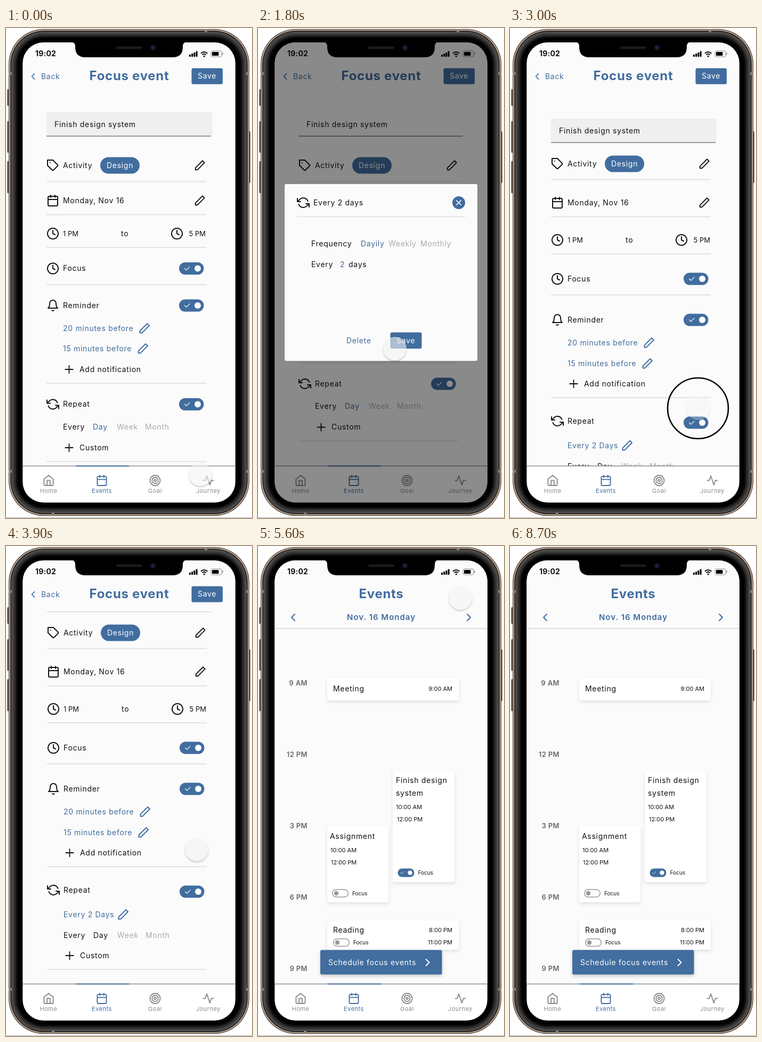
An HTML page for the animation above (8800 ms loop, 462 by 920 pixels).

```html
<!DOCTYPE html>
<html lang="en">
<head>
<meta charset="utf-8">
<title>Focus event</title>
<style>
  html, body { margin: 0; height: 100%; overflow: hidden; background: #fff; }
  svg { display: block; width: 100vw; height: 100vh; }
  .icon { fill: none; stroke-width: 2; stroke-linecap: round; stroke-linejoin: round; }
  .card { fill: #fff; filter: drop-shadow(0 3px 3px rgba(0, 0, 0, .1)); }
  #cursor { filter: drop-shadow(0 2px 1.5px rgba(0, 0, 0, .35)); }
</style>
</head>
<body>
<svg id="stage" viewBox="0 0 462 920"></svg>
<script>
const LOOP = 8800;
const BLUE = '#416d9f', INK = '#111', GRAY = '#aaa', PAGE = '#fbfbfb';

const ICONS = {
  tag: 'M20.59 13.41l-7.17 7.17a2 2 0 0 1-2.83 0L2 12V2h10l8.59 8.59a2 2 0 0 1 0 2.82zM7 7h.01',
  calendar: 'M5 4h14a2 2 0 0 1 2 2v14a2 2 0 0 1-2 2H5a2 2 0 0 1-2-2V6a2 2 0 0 1 2-2zM16 2v4M8 2v4M3 10h18',
  clock: 'M12 2a10 10 0 1 0 .01 0zM12 6v6l4 2',
  bell: 'M18 8A6 6 0 0 0 6 8c0 7-3 9-3 9h18s-3-2-3-9M13.73 21a2 2 0 0 1-3.46 0',
  repeat: 'M1 4v6h6M23 20v-6h-6M20.49 9A9 9 0 0 0 5.64 5.64L1 10m22 4-4.64 4.36A9 9 0 0 1 3.51 15',
  home: 'M3 9l9-7 9 7v11a2 2 0 0 1-2 2H5a2 2 0 0 1-2-2zM9 22V12h6v10',
  target: 'M12 2a10 10 0 1 0 .01 0zM12 6a6 6 0 1 0 .01 0zM12 10a2 2 0 1 0 .01 0z',
  pulse: 'M22 12h-4l-3 9L9 3l-3 9H2',
  pencil: 'M17.5 2.5l4 4L7 21H3v-4z',
  plus: 'M12 4v16M4 12h16',
  left: 'M15 6l-6 6 6 6',
  right: 'M9 6l6 6-6 6',
  close: 'M7 7l10 10M17 7L7 17',
  check: 'M5 12l5 5L20 7',
};

// Drawing helpers; y is always the vertical centre of text and icons
const text = (x, y, label, { fill = INK, size = 14, weight = 400, gap = .7, anchor = 'start', id = '' } = {}) =>
  `<text ${id && `id="${id}"`} x="${x}" y="${y + size * .355}" fill="${fill}" text-anchor="${anchor}" ` +
  `style="font:${weight} ${size}px Inter,sans-serif;letter-spacing:${gap}px">${label}</text>`;
const icon = (name, x, y, color = INK, scale = 1) =>
  `<path class="icon" d="${ICONS[name]}" stroke="${color}" transform="translate(${x - 12 * scale} ${y - 12 * scale}) scale(${scale})"/>`;
const rect = (x, y, w, h, fill, rx = 0, more = '') =>
  `<rect x="${x}" y="${y}" width="${w}" height="${h}" rx="${rx}" fill="${fill}" ${more}/>`;
const circle = (x, y, r, fill, more = '') => `<circle cx="${x}" cy="${y}" r="${r}" fill="${fill}" ${more}/>`;
const group = (id, body) => `<g id="${id}">${body}</g>`;
const button = (x, y, w, h, label, labelX) =>
  rect(x, y, w, h, BLUE, 3) + text(labelX, y + h / 2, label, { fill: '#fff' });
const toggle = y => rect(325, y - 11.5, 46.5, 23, BLUE, 11.5) + icon('check', 340, y, '#fff', .62) + circle(360, y, 6, '#fff');
const smallToggle = (x, y, on) => (on
  ? rect(x, y - 8, 31, 16, BLUE, 8) + icon('check', x + 8, y, '#fff', .4) + circle(x + 23, y, 4.2, '#fff')
  : rect(x + .7, y - 7, 29.6, 14, '#fff', 7, 'stroke="#999" stroke-width="1.5"') + circle(x + 8, y, 4.2, '#999'))
  + text(x + 38, y, 'Focus', { size: 10, gap: 0 });

// Form rows: position in the first layout, in the second, contents, options
const rows = [];
const row = (from, to, body, options = {}) => rows.push({ from, to, body, ...options });
const rule = (from, to, options) => row(from, to, rect(76, -1, 300, 2, '#e3e3e3'), options);
const LOWER = { lower: true };
const entry = (name, label) => icon(name, 88, 0) + text(107, 0, label);
const notice = (label, pencilX) => text(107, 0, label, { fill: BLUE }) + icon('pencil', pencilX, 0, BLUE, .95);
const addition = label => icon('plus', 118.5, 0, INK, .9) + text(138, 0, label);
const edit = icon('pencil', 364, 0, INK, .92);

row(181, 193, group('field', rect(76, -23, 311, 45, '#efefef')) + rect(76, 21, 309, 2, '#999') + text(91, 0, 'Finish design system'));
row(258, 255, entry('tag', 'Activity') + rect(177, -15.5, 74, 31, BLUE, 15.5) + text(189, 0, 'Design', { fill: '#fff' }) + edit);
rule(288.5, 284.5);
row(324, 328, entry('calendar', 'Monday, Nov 16') + edit);
rule(350.5, 354.5);
row(386, 398, icon('clock', 88, 0) + icon('clock', 321, 0) + text(107, 0, '1 PM', { size: 13, gap: 0 }) +
  text(216, 0, 'to') + text(375, 0, '5 PM', { size: 13, gap: 0, anchor: 'end' }));
rule(412, 424);
row(451.5, 471, entry('clock', 'Focus') + toggle(0));
rule(482, 501);
row(521, 548, entry('bell', 'Reminder') + toggle(0));
row(564, 591, notice('20 minutes before', 260), { show: 'full' });
row(602, 630, notice('15 minutes before', 257), { show: 'full' });
row(641, 668, addition('Add notification'), { show: 'full' });
row(564, 591, notice('15 minutes before', 257), { show: 'short' });
row(602, 630, addition('Add notification'), { show: 'short' });
rule(667, 694, LOWER);
row(706.5, 738, entry('repeat', 'Repeat'), LOWER);
row(706.5, 741, toggle(0), LOWER);
row(749, 784, notice('Every 2 Days', 219), { show: 'second' });
row(749, 823, text(107, 0, 'Every') + text(163, 0, 'Day', { id: 'day' }) +
  text(208, 0, 'Week', { fill: GRAY }) + text(261, 0, 'Month', { fill: GRAY }), LOWER);
row(788, 861, addition('Custom'), LOWER);
rule(814, 887, LOWER);

const heading = label => text(231.5, 89.5, label, { fill: BLUE, size: 24, weight: 700, anchor: 'middle' });
const formPage = rect(31, 27, 400, 796, PAGE) +
  `<g clip-path="url(#scroller)">${rows.map((r, i) => group('row' + i, r.body)).join('')}</g>` +
  icon('left', 51, 91, BLUE, .85) + text(66, 91, 'Back', { fill: BLUE }) + heading('Focus event') +
  button(348.5, 75.5, 58.5, 30, 'Save', 360);

const card = (x, y, w, h) => rect(x, y, w, h, '#fff', 3, 'class="card"');
const clockText = (x, y, label, anchor) => text(x, y, label, { size: 11, gap: 0, anchor });
const eventsPage = rect(31, 27, 400, 796, PAGE) + heading('Events') +
  icon('left', 66, 134, BLUE) + icon('right', 396, 134, BLUE) +
  text(231.5, 133.5, 'Nov. 16 Monday', { fill: BLUE, size: 15, weight: 600, gap: 1, anchor: 'middle' }) +
  rect(31, 154, 400, 1.6, '#d8d8d8') +
  ['9 AM', '12 PM', '3 PM', '6 PM', '9 PM'].map((label, i) =>
    text(93, 257 + i * 134.2, label, { fill: '#666', size: 13, weight: 600, gap: .4, anchor: 'end' })).join('') +
  card(130, 248, 247, 42) + text(141, 268, 'Meeting') + clockText(365, 268, '9:00 AM', 'end') +
  card(253, 422, 116, 209) + text(259, 440, 'Finish design') + text(259, 464, 'system') +
  clockText(259, 490, '10:00 AM') + clockText(261, 513, '12:00 PM') + smallToggle(262.5, 613.5, true) +
  card(130, 526, 115, 143) + text(135, 545, 'Assignment') +
  clockText(136, 571, '10:00 AM') + clockText(137, 594, '12:00 PM') + smallToggle(139, 652) +
  card(130, 703, 247, 55) + text(141, 721, 'Reading') + clockText(365, 721, '8:00 PM', 'end') +
  clockText(365, 744.5, '11:00 PM', 'end') + smallToggle(141, 744.5) +
  rect(117, 758.5, 228.5, 46, BLUE, 3, 'style="filter:drop-shadow(0 3px 3px rgba(0,0,0,.2))"') +
  text(132, 782, 'Schedule focus events', { fill: '#fff' }) + icon('right', 318.5, 782, '#fff');

const tabs = rect(31, 822, 400, 70, '#fff') + rect(31, 821.5, 400, 1.7, '#999') +
  rect(131, 821.5, 100, 1.8, BLUE, 0, 'id="indicator"') +
  [['home', 'Home'], ['calendar', 'Events'], ['target', 'Goal'], ['pulse', 'Journey']].map(([name, label], i) => {
    const x = 80 + i * 100, color = i === 1 ? BLUE : '#8b8b8b';
    return icon(name, x, 849.5, color, .95) + text(x, 869.5, label, { fill: color, size: 11, gap: .5, anchor: 'middle' });
  }).join('');

const statusBar = text(55, 48, '19:02', { weight: 700, gap: .2 }) +
  [4, 6, 8, 10.5].map((h, i) => rect(344 + i * 4.2, 54 - h, 3, h, '#000', .8)).join('') +
  '<path d="M366 47.5q6-5 12.5 0M368.5 50.3q3.5-3 7.5 0" fill="none" stroke="#000" stroke-width="2"/>' +
  circle(372.3, 53, 1.6, '#000') +
  rect(385, 43, 20, 11, 'none', 3, 'stroke="#888"') + rect(387, 45, 12.5, 7, '#000', 1) + rect(406, 46.5, 1.5, 4, '#888', .7);

const popup = rect(50, 293, 362, 332, PAGE, 3) + icon('repeat', 85, 328) + text(104, 328, 'Every 2 days') +
  circle(377, 328, 12, BLUE) + icon('close', 377, 328, '#fff', .85) + rect(73, 353.5, 316, 1.3, '#ddd') +
  text(100, 405.5, 'Frequency') + text(193, 405.5, 'Dayily', { fill: BLUE }) +
  text(245, 405.5, 'Weekly', { fill: GRAY }) + text(305, 405.5, 'Monthly', { fill: GRAY }) +
  text(100, 444, 'Every') + text(154, 444, '2', { fill: BLUE }) + text(170, 444, 'days') +
  text(166, 587, 'Delete', { fill: BLUE }) + button(248.5, 571.5, 59, 30.5, 'Save', 260);

// Metal rim fading through dark gray to the black bezel
const side = (x, y, h) => rect(x, y, 5, h, '#6f5f52', 1.5);
const shell = [[0, '#4a3a31'], [1.2, '#c9b5a2'], [3, '#2b2624'], [5, '#4e4c4a'], [8, '#3a3a3a'], [11, '#262626'], [14, '#0c0c0c'], [17, '#000']]
  .map(([d, fill]) => rect(5 + d, 2 + d, 452 - 2 * d, 914 - 2 * d, fill, 66 - d)).join('');
const phone = rect(0, 918.6, 462, 1.4, '#c4c4c4') +
  side(2, 115, 31) + side(2, 175, 59) + side(2, 250, 60) + side(454, 194, 97) + shell +
  [[5, 83, 6, 5], [451, 83, 6, 5], [5, 830, 6, 5], [451, 830, 6, 5], [373, 2, 5, 6], [86, 910, 5, 6]]
    .map(([x, y, w, h]) => rect(x, y, w, h, '#8d8075')).join('');
const notch = '<path d="M122 26Q130 27 130 34V36Q130 55 149 55H313Q332 55 332 36V34Q332 27 340 26Z"/>' +
  rect(207, 34.5, 49, 5, '#1b1b1b', 2.5) + circle(276, 37, 5.5, '#10131f') + circle(276, 37, 2.5, '#1d2850');

document.getElementById('stage').innerHTML =
  `<clipPath id="screen">${rect(31.3, 27, 399.5, 864, '#000', 39)}</clipPath>` +
  `<clipPath id="scroller">${rect(31, 123.5, 400, 698.5, '#000')}</clipPath>` + phone +
  `<g clip-path="url(#screen)">${group('form', formPage) + group('events', eventsPage) + tabs + statusBar +
    rect(31, 27, 400, 864, '#000', 0, 'id="shade"') + group('popup', popup)}</g>` + notch +
  circle(0, 0, 22, '#f4f4f4', 'id="cursor"') +
  circle(0, 0, 57, 'none', 'id="ring" stroke="#000" stroke-width="2.6"');

const $ = id => document.getElementById(id);
const clamp = v => Math.max(0, Math.min(1, v));
const lerp = (a, b, p) => a + (b - a) * p;
const easeOut = (t, start, end) => Math.sin(clamp((t - start) / (end - start)) * Math.PI / 2);
const easeInOut = (t, start, end) => (1 - Math.cos(clamp((t - start) / (end - start)) * Math.PI)) / 2;
const setOpacity = (id, value) => $(id).setAttribute('opacity', value);

// Pointer stops: time, x, y, opacity
const STOPS = [
  [0, 365, 838, .6], [750, 178, 795, .75], [1200, 178, 795, .75], [1800, 257, 602, .6], [2300, 257, 602, .6],
  [2900, 353, 714, .3], [3000, 353, 714, .3], [3500, 358, 570, .6], [4000, 358, 570, .6],
  [4800, 380, 98, .8], [5300, 380, 98, .8], [5600, 380, 98, .55], [5900, 380, 98, 0], [LOOP, 380, 98, 0],
];
function pointerAt(t) {
  const i = STOPS.findIndex(stop => stop[0] > t);
  const a = STOPS[i - 1], b = STOPS[i], p = easeInOut(t, a[0], b[0]);
  return [1, 2, 3].map(k => lerp(a[k], b[k], p));
}

function draw(t) {
  const dialog = easeOut(t, 860, 1160) - easeOut(t, 2200, 2500);
  const second = easeOut(t, 2200, 2600);
  const scroll = 92 * easeInOut(t, 3000, 3550);
  const visibility = { full: 1 - dialog, short: dialog, second };

  rows.forEach((r, i) => {
    const y = lerp(r.from, r.to, second) - scroll - (r.lower ? 38.5 * dialog : 0);
    $('row' + i).setAttribute('transform', `translate(${second} ${y})`);
    setOpacity('row' + i, r.show ? visibility[r.show] : 1);
  });
  setOpacity('field', 1 - dialog);
  $('day').setAttribute('fill', t < 2500 ? BLUE : INK);
  setOpacity('indicator', t > 2500 && t < 3300 ? 0 : 1);
  setOpacity('shade', .45 * dialog);
  setOpacity('popup', dialog);
  setOpacity('events', easeOut(t, 5050, 5350));

  const [x, y, opacity] = pointerAt(t);
  for (const id of ['cursor', 'ring']) $(id).setAttribute('transform', `translate(${x} ${y})`);
  setOpacity('cursor', opacity);
  setOpacity('ring', t >= 2900 && t < 3150 ? 1 : 0);
}

const start = performance.now();
function tick() {
  draw((performance.now() - start) % LOOP);
  requestAnimationFrame(tick);
}
tick();
</script>
</body>
</html>
```
